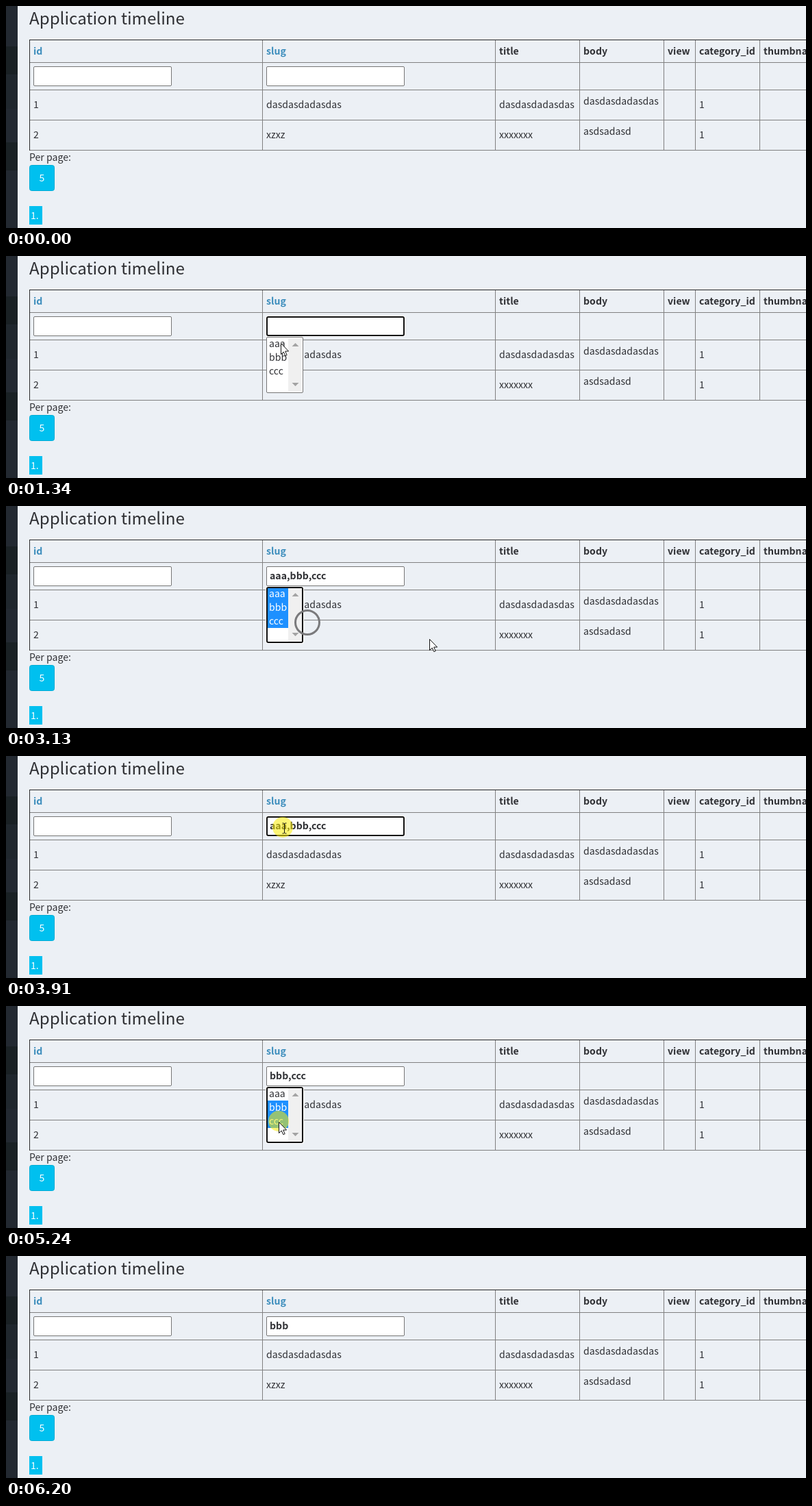
Recreate the animation shown at these times as an HTML page. Size 1168x324 px, loop 6.9 s.

```html
<!DOCTYPE html>
<html lang="en">
<head>
<meta charset="utf-8">
<title>Application timeline</title>
<style>
html, body { margin: 0; width: 100%; height: 100%; overflow: hidden; background: #ecf0f5; }
svg { display: block; width: 1168px; height: 324px; }
text {
  font: 14.1px "Noto Sans CJK JP", "Noto Sans CJK SC", "Noto Sans CJK KR", "Noto Sans CJK", "Open Sans", sans-serif;
  fill: #2f3034;
}
.b { font-weight: 700; }
.h { font-size: 24.15px; }
.link { fill: #3c8dbc; }
.w { fill: #fff; }
</style>
</head>
<body>
<svg viewBox="0 0 1168 324" xmlns="http://www.w3.org/2000/svg">
  <g id="page"></g>
  <g id="form"></g>
  <circle id="ring" fill="none" stroke="#7a7a7c" stroke-width="3"/>
  <circle id="press" r="15" fill="#fbec00" fill-opacity=".54"/>
  <path id="arrow" d="M.5 .5V16.5L4.2 13 6.8 18.6 9.2 17.6 6.7 12H11.6Z" fill="#fff" stroke="#111"/>
  <path id="beam" d="M-3 -7.5H-1L0 -6.5 1 -7.5H3M0 -6.5V6.5M-3 7.5H-1L0 6.5 1 7.5H3" fill="none" stroke="#111"/>
</svg>
<script>
const LOOP = 6900;
const LEAD = 200;      // the pointer rests this long before a click
const LINGER = 70;     // and this long after it
const RING_STEP = 65, RING_LIFE = 350;
const OPTIONS = ['aaa', 'bbb', 'ccc'];

// Everything else follows from these clicks and the few points passed between them.
const clicks = [
  { t: 600,  hold: 170, x: 406, y: 105, on: 'field' },
  { t: 1470, hold: 100, x: 401, y: 127, on: 'aaa' },
  { t: 1930, hold: 170, x: 397, y: 142, on: 'bbb' },
  { t: 2600, hold: 140, x: 397, y: 164, on: 'ccc' },
  { t: 3910, hold: 70,  x: 406, y: 105, on: 'field' },
  { t: 4440, hold: 70,  x: 397, y: 136, on: 'aaa' },
  { t: 5240, hold: 70,  x: 398, y: 169, on: 'ccc' },
  { t: 6130, hold: 70,  x: 624, y: 206, on: 'away' }
];
const passing = [
  { t: 70,   x: 756, y: 258 },
  { t: 2870, x: 440, y: 170, ring: true },
  { t: 3130, x: 618, y: 194 },
  { t: 3490, x: 577, y: 105 },
  { t: 5580, x: 656, y: 216, ring: true }
];
const release = c => c.t + c.hold;
const GONE = release(clicks[clicks.length - 1]);
const path = clicks
  .flatMap(c => [{ ...c, t: c.t - LEAD }, { ...c, t: release(c) + LINGER }])
  .concat(passing)
  .sort((a, b) => a.t - b.t);

const $ = id => document.getElementById(id);
const set = (id, attrs) => {
  for (const k in attrs) $(id).setAttribute(k, attrs[k]);
};
const show = (id, on) => set(id, { visibility: on ? 'visible' : 'hidden' });
const rect = (x, y, w, h, fill, more = '') =>
  `<rect x="${x}" y="${y}" width="${w}" height="${h}" fill="${fill}" ${more}/>`;
const text = (x, y, s, cls = '') => `<text x="${x}" y="${y}" class="${cls}">${s}</text>`;

// A thin grey edge, or a thick dark one inside a white halo when focused.
const control = (x, y, w, h, focused) => focused
  ? rect(x - 1, y - 1, w + 2, h + 2, '#fff', 'rx="3"') +
    rect(x + 1, y + 1, w - 2, h - 2, '#fff', 'rx="2" stroke="#101010" stroke-width="2"')
  : rect(x + .5, y + .5, w - 1, h - 1, '#fff', 'rx="1.5" stroke="#767676"');

function drawPage() {
  const cols = [34, 374, 714, 837, 960, 1006, 1100];
  const heads = ['id', 'slug', 'title', 'body', 'view', 'category_id', 'thumbnail'];
  const rows = [
    ['1', 'dasdasdadasdas', 'dasdasdadasdas', 'dasdasdadasdas', '', '1'],
    ['2', 'xzxz', 'xxxxxxx', 'asdsadasd', '', '1']
  ];
  let s = rect(0, 0, 17, 324, '#232931') + rect(0, 101, 17, 49, '#20272d');
  for (const y of [59, 199]) s += rect(0, y, 17, 41, '#1a2124');
  s += text(34, 27, 'Application timeline', 'h');
  for (const y of [82, 122, 166, 210]) s += rect(34, y, 1134, 1, '#808080');
  for (const x of cols.slice(1)) s += rect(x, 50, 1, 161, '#808080');
  s += rect(34, 49, 1134, 1, '#2a2a2a') + rect(34, 49, 1, 162, '#2a2a2a');
  heads.forEach((h, i) => s += text(cols[i] + 6, 71, h, i < 2 ? 'b link' : 'b'));
  rows.forEach((row, r) => row.forEach((cell, i) =>
    s += text(cols[i] + 6, 149 + 44 * r - (i === 3 ? 5 : 0), cell)));
  s += control(40, 88, 202, 29, false);
  s += text(34, 226, 'Per page:');
  s += rect(34.5, 232.5, 36, 37, '#00c0ef', 'rx="3" stroke="#00acd6"') + text(48.5, 256, '5', 'w');
  s += rect(34, 292, 19, 27, '#00c0ef') + text(36, 311, '1.', 'w');
  $('page').innerHTML = s;
}

// Replays the clicks made so far.
function formAt(t) {
  const form = { focus: '', open: false, picks: [] };
  for (const c of clicks) {
    if (t < c.t) break;
    const done = t >= release(c);
    if (c.on === 'field') {
      form.focus = 'field';
      form.open = done;
    } else if (c.on === 'away') {
      form.focus = '';
      form.open = false;
    } else {
      form.focus = 'list';
      if (done) form.picks = OPTIONS.filter(o => form.picks.includes(o) !== (o === c.on));
    }
  }
  return form;
}

function listBox(focused, picks) {
  let s = control(380, 118, 54, 82, focused) + rect(412, 120, 20, 78, '#f0f0f0');
  s += '<path d="M417.5 132L422.5 127 427.5 132ZM417.5 185L422.5 190 427.5 185Z" fill="#a3a3a3"/>';
  OPTIONS.forEach((o, i) => {
    const on = picks.includes(o), top = Math.max(120, 118 + 20 * i);
    if (on) s += rect(382, top, 30, 138 + 20 * i - top, '#1e90ff');
    s += text(384, 133 + 20 * i, o, on ? 'w' : '');
  });
  return s;
}

function pointerAt(t) {
  const i = path.findIndex(p => p.t > t);
  if (i < 1 || t >= GONE) return null;
  const a = path[i - 1], b = path[i];
  const u = (t - a.t) / (b.t - a.t), e = u * u * (3 - 2 * u);
  return { x: Math.round(a.x + (b.x - a.x) * e), y: Math.round(a.y + (b.y - a.y) * e) };
}

let last = '';
function render(t) {
  const form = formAt(t), key = JSON.stringify(form);
  if (key !== last) {
    last = key;
    $('form').innerHTML = control(380, 88, 202, 29, form.focus === 'field') +
      text(385, 107, form.picks.join(), 'b') +
      (form.open ? listBox(form.focus === 'list', form.picks) : '');
  }

  const ring = passing.find(p => p.ring && t >= p.t && t < p.t + RING_LIFE);
  show('ring', ring);
  if (ring) {
    const step = Math.min(4, Math.floor((t - ring.t) / RING_STEP));
    set('ring', { r: 97.5 - 20 * step, cx: ring.x, cy: ring.y });
  }

  const p = pointerAt(t);
  const inField = p && p.x > 380 && p.x < 582 && p.y > 88 && p.y < 118;
  show('arrow', p && !inField);
  show('beam', p && inField);
  show('press', p && clicks.some(c => c.on !== 'away' && t >= c.t && t < release(c)));
  if (p) {
    set('arrow', { transform: `translate(${p.x} ${p.y})` });
    set('beam', { transform: `translate(${p.x + .5} ${p.y + .5})` });
    set('press', { cx: p.x - (inField ? 2 : 0), cy: p.y - 1 });
  }
}

function tick() {
  render(performance.now() % LOOP);
  requestAnimationFrame(tick);
}
drawPage();
tick();
</script>
</body>
</html>
```
